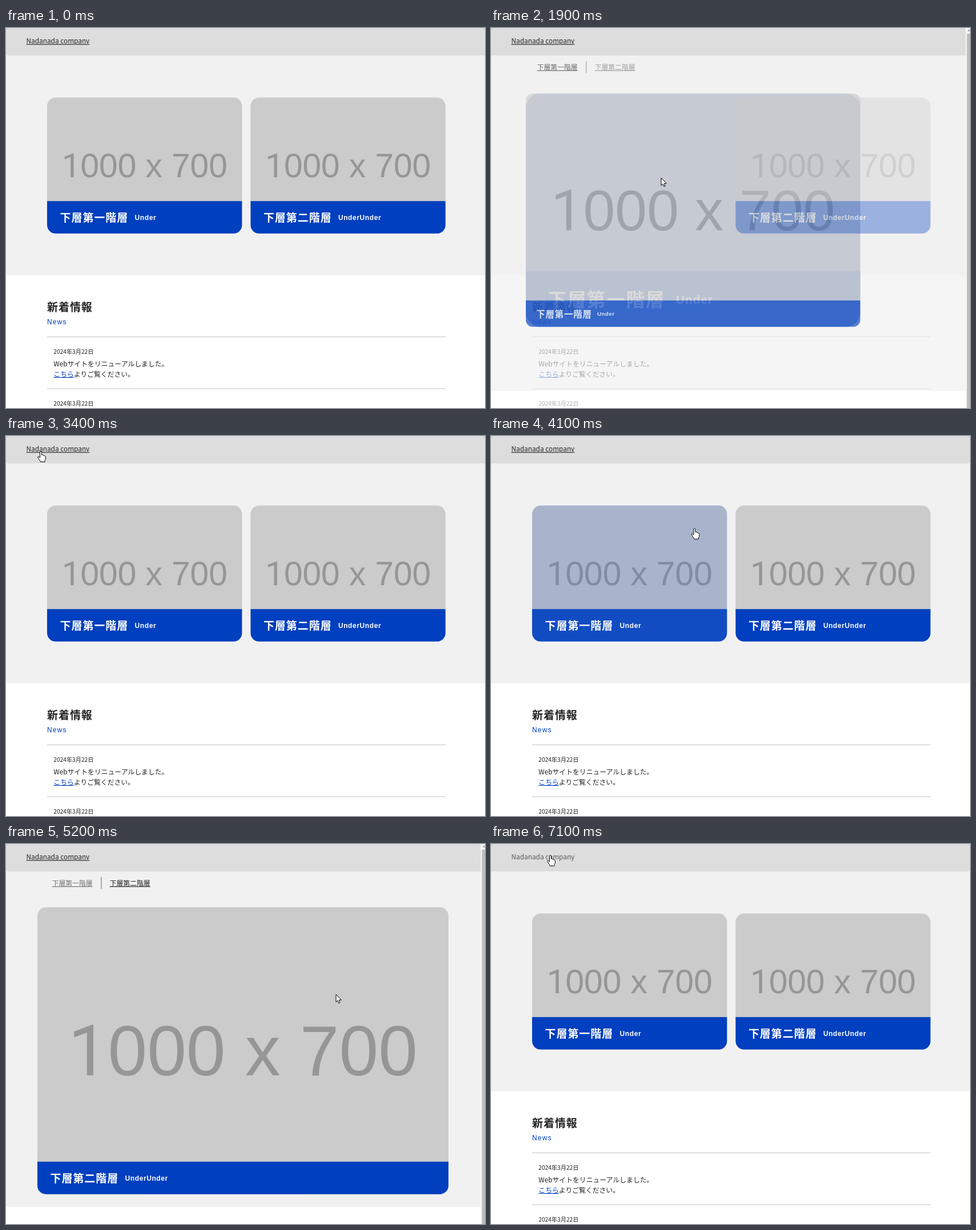
Recreate the animation shown at these times as an HTML page. Size 839 by 667 pixels, loop 7.2 s.

```html
<!DOCTYPE html>
<html lang="ja">
<head>
<meta charset="utf-8">
<title>View transition</title>
<style>
  html, body { margin: 0; width: 100%; height: 100%; overflow: hidden; background: #fff; }
  svg { display: block; font: 11.83px "Noto Sans CJK JP", "Noto Sans CJK", sans-serif; fill: #222; }
  .link { text-decoration: underline; }
  .heading { font-weight: 700; font-size: 19px; letter-spacing: .95px; }
  .latin { font-family: "Liberation Sans", Arial, sans-serif; font-size: 12px; }
  .plain-one { font-family: Roboto, sans-serif; }
  .date { font-size: 10.2px; }
  .rule { fill: #d6d6d6; }
</style>
</head>
<body>
<svg id="stage" width="839" height="667" viewBox="0 0 839 667"></svg>
<script>
const LOOP = 7200, STEP = 100, FADE = 400;
const BLUE = '#003fbf';
const NAMES = [['下層第一階層', 'Under'], ['下層第二階層', 'UnderUnder']];
const SMALL = [{ x: 72, y: 122, w: 341.4 }, { x: 428.4, y: 122, w: 341.4 }];
const BIG = { x: 55, y: 111, w: 720 };
const RATIO = 0.6995;

// Page changes: start time and whether a lower page is the destination.
const VISITS = [[1750, 1], [2960, 0], [4787, 1], [6560, 0]];
const HOVER = [
  [[600, 0], [900, 1], [2300, 1], [2301, 0], [3980, 0], [4180, .65], [4380, 0]],
  [[4200, 0], [4500, 1], [5300, 1], [5301, 0]]
];
const POINTER = [
  [100, 830, 568], [500, 500, 400], [800, 311, 273], [900, 311, 273], [1400, 298, 263],
  [2200, 298, 263], [2700, 61, 27], [3700, 61, 27], [4400, 578, 264], [5700, 578, 264], [6100, 104, 20]
];

const rect = (x, y, w, h, fill) => `<rect x="${x}" y="${y}" width="${w}" height="${h}" fill="${fill}"/>`;
const text = (x, y, str, attrs = '') => `<text x="${x}" y="${y}" ${attrs}>${str}</text>`;
const rule = y => `<rect class="rule" x="72" y="${y}" width="698" height="1.5"/>`;

function card(id, w, [name, latin]) {
  const h = w * RATIO, bar = h - 57;
  const size = '<tspan class="plain-one">1</tspan>000 x 700';
  return `<g id="${id}" mask="url(#round${w})">
    ${rect(-1, -1, w + 2, h + 2, BLUE)}
    <g class="picture">
      ${rect(-1, -1, w + 2, bar + 1, '#cbcbcb')}
      ${text(w / 2, w * .41, size, `class="latin" text-anchor="middle" fill="#969696" style="font-size:${w * .1715}px"`)}
    </g>
    ${text(22.5, bar + 36, name, 'class="heading" fill="#fff"')}
    ${text(153.5, bar + 33.4, latin, 'class="latin" font-weight="700" letter-spacing=".6" fill="#fff"')}
  </g>`;
}

const rounded = w => `<mask id="round${w}" maskUnits="userSpaceOnUse" x="-1" y="-1" width="${w + 2}" height="${w}">
  <rect width="${w}" height="${w * RATIO}" rx="15" fill="#fff"/></mask>`;

document.getElementById('stage').innerHTML = `
  <defs>${rounded(SMALL[0].w)}${rounded(BIG.w)}</defs>
  <g>
    ${rect(0, 0, 839, 667, '#fff')}${rect(0, 48, 839, 386, '#f1f1f1')}
    ${text(72, 496.5, '新着情報', 'class="heading"')}
    ${text(72, 520, 'News', `class="latin" letter-spacing="1.2" fill="${BLUE}"`)}
    ${rule(541.3)}
    ${text(83.3, 571.8, '2024年3月22日', 'class="date"')}
    ${text(83.3, 594, 'Webサイトをリニューアルしました。')}
    ${text(83.3, 611.8, `<tspan class="link" fill="${BLUE}">こちら</tspan>よりご覧ください。`)}
    ${rule(632.5)}
    ${text(83.3, 663.3, '2024年3月22日', 'class="date"')}
  </g>
  <g id="page">
    ${rect(0, 0, 839, 667, '#fff')}${rect(0, 48, 839, 589, '#f1f1f1')}
    ${text(80.7, 73.2, NAMES[0][0], 'class="link" id="nav0"')}
    ${rect(166.4, 58, 1, 21, '#666')}
    ${text(181.7, 73.2, NAMES[1][0], 'class="link" id="nav1"')}
  </g>
  ${card('small0', SMALL[0].w, NAMES[0])}
  ${card('big0', BIG.w, NAMES[0])}
  ${card('big1', BIG.w, NAMES[1])}
  ${card('small1', SMALL[1].w, NAMES[1])}
  ${rect(0, 0, 839, 48, '#ddd')}
  ${text(35.5, 27.2, 'Nadanada company', 'id="logo"')}
  <g id="scrollbar">
    ${rect(831.5, 0, 7.5, 667, '#f8f8f8')}${rect(833.5, 10, 5.5, 657, '#bdbdbd')}
    <path d="M834.5 5.5L837 2.5 839 5.5Z" fill="#888"/>
  </g>
  <g id="pointer" fill="#fff" stroke="#000" stroke-linejoin="round">
    <path id="arrow" d="M0 0V13.5L3 10.7 5 15.3 7.2 14.4 5.2 9.8H9.3Z"/>
    <path id="hand" d="M-1.5 1.2Q-1.5 0 0 0Q1.5 0 1.5 1.2V6Q4 5.6 4.2 7Q6.2 6.6 6.5 8Q8.4 8 8.4 9.8V13Q8.2 15 6.8 16.5V18.5H-.8V17Q-3.5 14-5.2 10.8Q-5.6 9-3.9 9.2Q-2.6 9.8-1.5 11.2Z"/>
  </g>`;

const $ = id => document.getElementById(id);
const show = (el, on) => { el.style.display = on ? '' : 'none'; };
const mix = (a, b, k) => a + (b - a) * k;

// CSS "ease", solved by bisection.
function ease(x) {
  if (x <= 0) return 0;
  if (x >= 1) return 1;
  const bezier = (s, a, b) => 3 * (1 - s) ** 2 * s * a + 3 * (1 - s) * s * s * b + s ** 3;
  let lo = 0, hi = 1;
  for (let i = 0; i < 24; i++) {
    const mid = (lo + hi) / 2;
    if (bezier(mid, .25, .25) < x) lo = mid; else hi = mid;
  }
  return bezier(lo, .1, 1);
}

// Values of a keyframe list [time, ...values] at time t.
function track(keys, t) {
  const next = keys.findIndex(k => k[0] > t);
  if (next === 0) return keys[0].slice(1);
  if (next < 0) return keys[keys.length - 1].slice(1);
  const a = keys[next - 1], b = keys[next];
  const k = (t - a[0]) / (b[0] - a[0]);
  return a.slice(1).map((v, i) => mix(v, b[i + 1], k));
}

function place(el, box, baseWidth, opacity) {
  el.setAttribute('transform', `translate(${box.x} ${box.y}) scale(${box.w / baseWidth})`);
  el.style.opacity = opacity;
  show(el, opacity > 0);
}

function render(t) {
  const visit = VISITS.filter(v => v[0] <= t).pop();
  const onPage = visit ? visit[1] : 0;
  const progress = visit ? ease((t - visit[0]) / FADE) : 0;
  const pageShown = visit && !onPage ? 1 - progress : progress;
  const active = t < 3700 ? 0 : 1;

  $('page').style.opacity = pageShown;
  show($('scrollbar'), onPage);

  for (const i of [0, 1]) {
    const small = $('small' + i), big = $('big' + i);
    const morph = i === active ? pageShown : 0;
    const box = {};
    for (const key of ['x', 'y', 'w']) box[key] = mix(SMALL[i][key], BIG[key], morph);
    const [hover] = track(HOVER[i], t);
    place(small, box, SMALL[i].w, (1 - pageShown) * (pageShown ? 1 : 1 - .2 * hover));
    place(big, box, BIG.w, morph);
    small.querySelector('.picture').style.opacity = 1 - .5 * hover;
    $('nav' + i).style.opacity = i === active ? 1 : .6;
  }

  const [x, y] = track(POINTER, t);
  const overLogo = x > 35 && x < 146 && y > 13 && y < 33;
  const overCard = !onPage && SMALL.some(c => x > c.x && x < c.x + c.w && y > c.y && y < c.y + c.w * RATIO);
  const logoHover = overLogo && !(t >= 2960 && t < 4500);
  $('logo').style.textDecoration = logoHover ? 'none' : 'underline';
  $('logo').style.opacity = logoHover ? .7 : 1;
  $('pointer').setAttribute('transform', `translate(${x} ${y})`);
  show($('pointer'), t >= 100);
  show($('hand'), overLogo || overCard);
  show($('arrow'), !overLogo && !overCard);
}

const start = performance.now();
function frame() {
  const t = (performance.now() - start) % LOOP;
  render(Math.floor(t / STEP) * STEP);
  requestAnimationFrame(frame);
}
frame();
</script>
</body>
</html>
```
